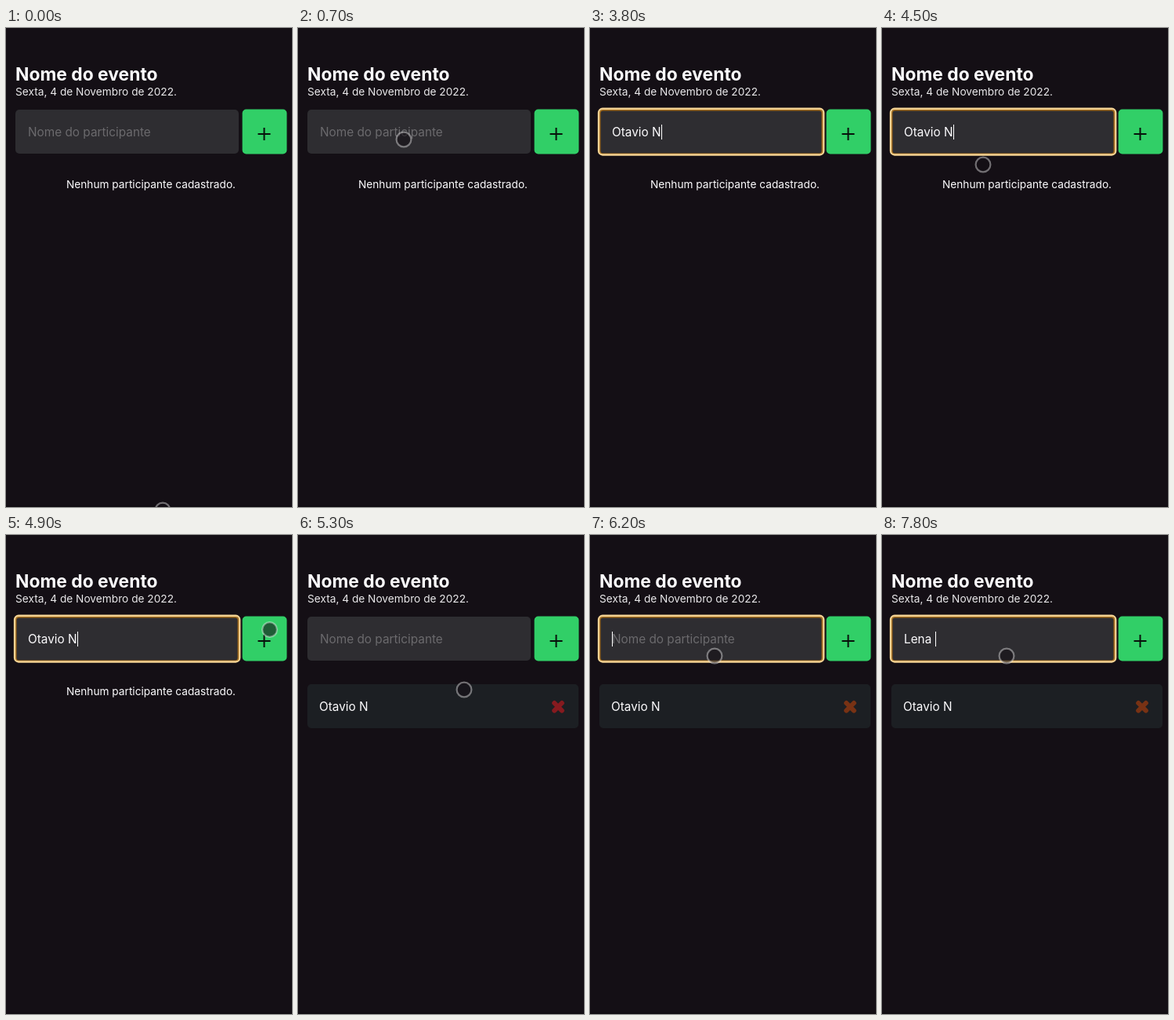
An HTML page for the animation above (8000 ms loop, 365 by 610 pixels).

```html
<!DOCTYPE html>
<html lang="pt-BR">
<head>
<meta charset="utf-8">
<title>Nome do evento</title>
<style>
  html, body { margin: 0; width: 100%; height: 100%; overflow: hidden; background: #140f15; }
  svg { display: block; width: 365px; height: 610px; }
  text { font-family: Inter, sans-serif; font-size: 15.35px; fill: #fdfcfe; white-space: pre; }
  .title { font-size: 22.85px; font-weight: 700; }
  .small { font-size: 13.7px; }
  .hint { fill: #6b6a6d; }
</style>
</head>
<body>
<svg viewBox="0 0 365 610">
  <rect width="365" height="610" fill="#140f15"/>
  <text class="title" x="12" y="67">Nome do evento</text>
  <text class="small" x="12" y="86" style="fill:#e9e8ea">Sexta, 4 de Novembro de 2022.</text>

  <rect x="12" y="104" width="285" height="56" rx="5" fill="#2e2d31"/>
  <g id="focus" fill="none">
    <rect x="12.5" y="104.5" width="284" height="56" rx="4" stroke="#a06a1c" stroke-width="2"/>
    <rect x="11" y="102.75" width="287.25" height="58.75" rx="5" stroke="#f4d292" stroke-width="2.3"/>
  </g>
  <text id="hint" class="hint" x="28" y="138">Nome do participante</text>
  <text id="typed" x="28" y="138" xml:space="preserve"></text>
  <rect id="caret" y="123" width="1" height="19" fill="#fff"/>

  <rect x="301.6" y="103.6" width="56.8" height="56.8" rx="5" fill="#31cf67"/>
  <path d="M321.5 135h16M329.5 127v16" stroke="#07120b" stroke-width="2"/>

  <text id="empty" class="small" x="185" y="204" text-anchor="middle">Nenhum participante cadastrado.</text>
  <g id="card">
    <rect x="12" y="190" width="346" height="56" rx="5" fill="#1c1f23"/>
    <text x="27" y="224">Otavio N</text>
    <path id="remove" d="M327.2 214l9.6 9.6M336.8 214l-9.6 9.6" stroke-width="6" stroke-linecap="round"/>
  </g>

  <rect y="608" width="365" height="2" fill="#100c11"/>
  <circle id="pointer" r="9.4" fill="#140f15" fill-opacity=".6" stroke="#fff" stroke-opacity=".4" stroke-width="2.2"/>
</svg>
<script>
const LOOP = 8000, STEP = 100;
const SUBMIT = 5100, REFOCUS = 6000;
const ui = id => document.getElementById(id);
const show = (id, on) => ui(id).setAttribute('visibility', on ? 'visible' : 'hidden');

// Times at which each further character appears
const entries = [
  { text: 'Otavio N', keys: [2100, 2400, 2600, 2800, 3000, 3200, 3800, 3800], end: SUBMIT },
  { text: 'Lena ', keys: [6900, 7000, 7200, 7300, 7800], end: LOOP }
];

// Pointer path: time, x, y
const path = [
  [0, 200, 614], [700, 135, 142], [900, 135, 142], [1000, 129, 174],
  [4500, 129, 174], [4900, 336.5, 120.5], [5100, 336, 122],
  [5300, 212, 197], [5900, 159, 154], [LOOP, 159, 154]
];

function pointerAt(t) {
  const i = path.findIndex(p => p[0] > t);
  const [t0, x0, y0] = path[i - 1], [t1, x1, y1] = path[i];
  const u = (t - t0) / (t1 - t0), e = u * u * (3 - 2 * u);
  return [x0 + (x1 - x0) * e, y0 + (y1 - y0) * e];
}

function render(t) {
  const { text, keys } = entries.find(e => t < e.end);
  const value = text.slice(0, keys.filter(k => k <= t).length);
  const focused = (t >= 900 && t < SUBMIT) || t >= REFOCUS;
  const typed = ui('typed');

  typed.textContent = value;
  show('hint', !value);
  show('focus', focused);
  show('caret', focused);
  ui('caret').setAttribute('x', Math.round(28 + (value ? typed.getComputedTextLength() : 0)));

  show('empty', t < SUBMIT);
  show('card', t >= SUBMIT);
  ui('remove').setAttribute('stroke', t < REFOCUS ? '#861a1f' : '#783214');

  const [x, y] = pointerAt(t);
  ui('pointer').setAttribute('transform', `translate(${x} ${y})`);
  show('pointer', t < 2400 || t >= 4500);
}

const start = performance.now();
function frame() {
  const t = (performance.now() - start) % LOOP;
  render(Math.floor(t / STEP) * STEP);
  requestAnimationFrame(frame);
}
frame();
</script>
</body>
</html>
```
